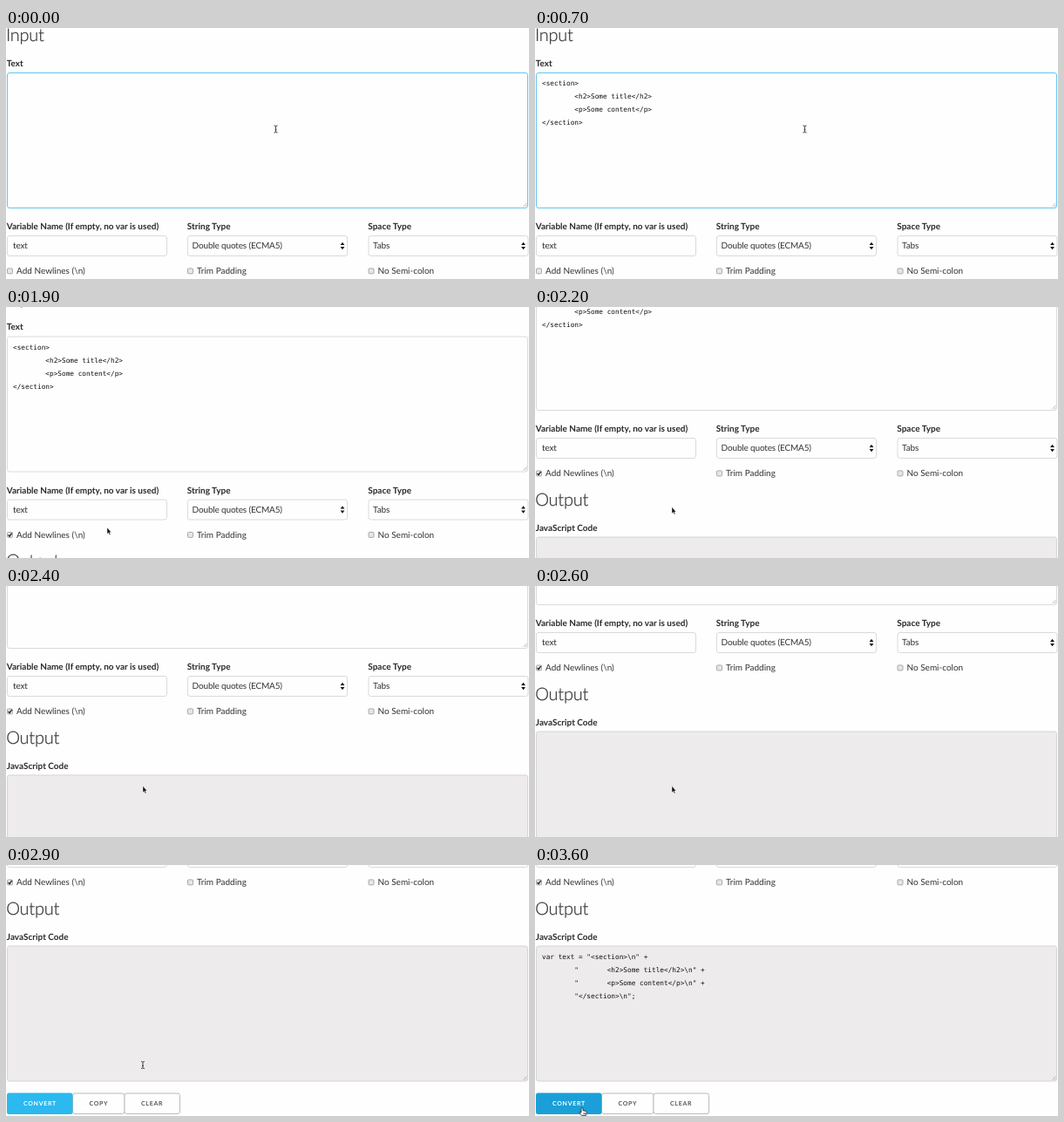
An HTML page that plays this animation: 600x288 px, repeating every 4000 ms.

```html
<!DOCTYPE html>
<html lang="en">
<head>
<meta charset="utf-8">
<title>Text to JavaScript string</title>
<style>
  html, body { margin: 0; width: 100%; height: 100%; overflow: hidden; background: #fefefe; }
  svg { display: block; width: 600px; height: 288px; }
  text { font: 10px Lato, "Open Sans", sans-serif; fill: #333; white-space: pre; text-rendering: geometricPrecision; }
  .title { font-size: 20px; font-weight: 300; letter-spacing: -.25px; stroke: #333; stroke-width: .2px; }
  .label { font-weight: 700; fill: #2a2a2a; }
  .value { letter-spacing: -.16px; }
  .code { font: 7.75px "DejaVu Sans Mono", "Noto Sans Mono", monospace; fill: #111; }
  .btn { font-size: 7px; font-weight: 700; letter-spacing: .7px; fill: #555; }
  .light { fill: #fff; }
  .box { fill: #fefefe; stroke: #dadada; }
  .out { fill: #eeebec; stroke: #d6d5d6; }
  .btnbox { fill: #fefefe; stroke: #bbb; }
</style>
</head>
<body>
<svg id="stage" viewBox="0 0 600 288"></svg>
<script>
const text = (x, y, s, cls = "") => {
  const safe = s.replace(/</g, "&lt;").replace(/>/g, "&gt;");
  return `<text x="${x}" y="${y}" class="${cls}">${safe}</text>`;
};
const rect = (x, y, w, h, cls, id = "") =>
  `<rect x="${x}" y="${y}" width="${w}" height="${h}" rx="2.5" class="${cls}" id="${id}"/>`;
const code = (id, y, lines) =>
  `<g id="${id}">${lines.map((s, i) => text(8, y + 15 * i, s, "code")).join("")}</g>`;
const grip = y => `<path d="M593.5 ${y - 2}l4-4M596 ${y - 2}l1.5-1.5" stroke="#999" stroke-width=".7"/>`;
const arrows = (x, y) =>
  `<path d="M${x - 2.4} ${y - 1}h4.8l-2.4-3.2zM${x - 2.4} ${y + 1}h4.8l-2.4 3.2z" fill="#111"/>`;
const check = (x, s) =>
  `<rect x="${x + .5}" y="275.9" width="6" height="6" rx="1" fill="#e6e6e6" stroke="#a2a2a2" stroke-width=".9"/>` +
  text(x + 11, 282.3, s);
const tab = " ".repeat(8);

const columns = [
  [1, "Variable Name (If empty, no var is used)", "text", "Add Newlines (\\n)"],
  [208, "String Type", "Double quotes (ECMA5)", "Trim Padding"],
  [415.5, "Space Type", "Tabs", "No Semi-colon"]
].map(([x, label, value, option], i) =>
  text(x - .2, 231.2, label, "label") +
  rect(x + .5, 238.5, 183, 23, "box") +
  text(x + (i ? 5.6 : 7), 253.4, value, "value") +
  (i ? arrows(x + 178, 250) : "") +
  check(x, option)
).join("");

const stage = document.getElementById("stage");
stage.innerHTML = `
  <g id="page">
    ${text(0, 14.6, "Input", "title")}
    ${text(.8, 43.8, "Text", "label")}
    ${rect(1.5, 51.5, 597, 155, "box", "input")}${grip(207)}
    ${code("typed", 66, [
      "<section>",
      tab + "<h2>Some title</h2>",
      tab + "<p>Some content</p>",
      "</section>"
    ])}
    <path id="caret" d="M55 102.5v9.5" stroke="#111" stroke-width=".8"/>
    ${columns}
    <path id="tick" d="M2.6 279l1.5 1.7 2.6-3.8" fill="none" stroke="#222" stroke-width="1.3"/>
    ${text(.2, 315.6, "Output", "title")}
    ${text(.8, 344.6, "JavaScript Code", "label")}
    ${rect(1.5, 352, 597, 155, "out")}${grip(507.5)}
    ${code("result", 366.5, [
      'var text = "<section>\\n" +',
      tab + '"       <h2>Some title</h2>\\n" +',
      tab + '"       <p>Some content</p>\\n" +',
      tab + '"</section>\\n";'
    ])}
    ${rect(76.5, 521, 59.5, 23.5, "btnbox")}
    ${rect(136, 521, 63.5, 23.5, "btnbox")}
    <rect id="convert" x="1" y="520.5" width="75.5" height="24.5" rx="2.5"/>
    ${text(20, 535, "CONVERT", "btn light")}
    ${text(95.5, 535, "COPY", "btn")}
    ${text(155, 535, "CLEAR", "btn")}
  </g>
  <g id="cursor">
    <path id="beam" d="M-2-4Q0-4 0-3Q0-4 2-4M0-3V3M-2 4Q0 4 0 3Q0 4 2 4M-1 .8H1" fill="none" stroke="#333" stroke-width=".9"/>
    <path id="arrow" d="M0 0V7.4L1.6 6 2.7 8.5 3.9 8 2.8 5.5H4.8Z" fill="#111" stroke="#fff" stroke-width=".4"/>
    <path id="hand" d="M-1 .6Q0-.6 1 .6V3.2L4.4 4Q5.3 4.4 5.1 5.8L4.4 9H-.4L-3 5.8Q-3.2 4.6-2 5L-1 5.8Z M2 5.8V7.8M3.3 5.8V7.8" fill="#fff" stroke="#222" stroke-width=".8"/>
  </g>`;

const $ = id => document.getElementById(id);
const show = (id, on) => { $(id).style.display = on ? "" : "none"; };

// Tracks: [time, value, ...]
const scroll = [[800, 0], [1000, 17.5], [1900, 17.5], [2400, 135], [2700, 210], [2900, 259]];
const pointer = [
  [800, 309.5, 116], [1000, 274, 135], [1300, 92, 251], [1400, 79, 256], [1600, 79, 256],
  [1900, 116, 253], [2200, 157, 229.5], [2900, 157, 229.5], [3200, 66, 273], [3300, 54, 278.5]
];
const shapes = [[0, "beam"], [1200, "arrow"], [2900, "beam"], [3100, "hand"]];

function at(track, t) {
  const i = track.findIndex(k => k[0] > t);
  if (i === 0) return track[0].slice(1);
  if (i < 0) return track[track.length - 1].slice(1);
  const a = track[i - 1], b = track[i], p = (t - a[0]) / (b[0] - a[0]);
  return a.slice(1).map((v, n) => v + (b[n + 1] - v) * p);
}

function draw(t) {
  const [x, y] = at(pointer, t);
  const shape = shapes.filter(s => s[0] <= t).pop()[1];
  $("page").setAttribute("transform", `translate(0 ${-at(scroll, t)[0]})`);
  $("cursor").setAttribute("transform", `translate(${x} ${y})`);
  for (const id of ["beam", "arrow", "hand"]) show(id, id === shape);
  show("typed", t >= 100);
  show("caret", t >= 200 && t < 700);
  show("tick", t >= 1500);
  show("result", t >= 3600);
  $("input").style.stroke = t < 1400 ? "#62c6ee" : "#dadada";
  $("convert").style.fill = t < 3200 ? "#2bb9ef" : "#1a9fd8";
}

const start = performance.now();
function tick(now) {
  const t = Math.max(0, now - start) % 4000;
  draw(Math.floor(t / 100) * 100);
  requestAnimationFrame(tick);
}
draw(0);
requestAnimationFrame(tick);
</script>
</body>
</html>
```
